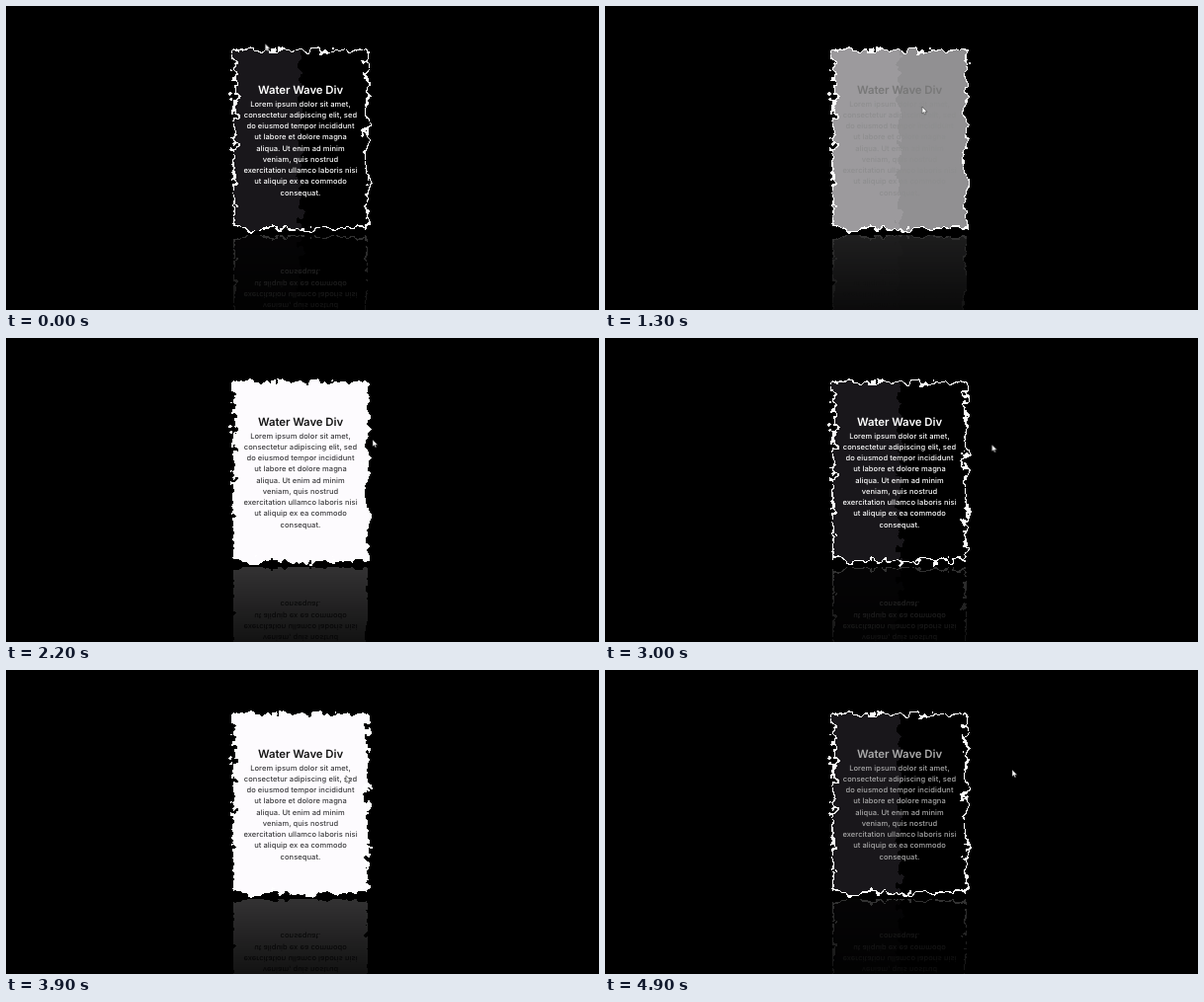
An HTML page for the animation above (5 s loop, 600x308 px).

```html
<!DOCTYPE html>
<html lang="en">
<head>
<meta charset="utf-8">
<title>Water Wave Div</title>
<style>
  html, body { margin: 0; width: 100%; height: 100%; overflow: hidden; background: #000; }
  svg { position: absolute; }
  .card {
    position: absolute; left: 230px; top: 44px; width: 136px; height: 183px;
    -webkit-box-reflect: below 5px linear-gradient(transparent 35%, rgba(0, 0, 0, .2));
  }
  .wave {
    position: absolute; inset: 0; box-sizing: border-box;
    border: 2px solid #fff; background: #000; filter: url(#wave);
    animation: fill 5s infinite; --off: #000;
  }
  .half {
    position: absolute; left: 0; top: 0; width: 50%; height: 100%;
    animation: fill 5s infinite; --off: #19171b;
  }
  .text {
    position: absolute; left: -10px; right: -10px; top: 32.5px; text-align: center;
    font: 500 7.5px/11.25px Inter, "Open Sans", sans-serif; letter-spacing: .08px;
    text-rendering: geometricPrecision; white-space: pre-line;
    animation: ink 5s infinite; --on: #3a3a3c;
  }
  h2 {
    margin: 0; font-size: 11.4px; line-height: 17px; font-weight: 600; letter-spacing: -.06px;
    position: relative; top: .5px;
    animation: ink 5s infinite; --on: #141414;
  }
  p { margin: 0; }
  .cursor { left: 0; top: 0; overflow: visible; animation: move 5s linear infinite; }

  @keyframes fill {
    0%, 22.7% { background: var(--off); }
    32.7%, 44% { background: #fdfbfe; }
    54%, 63.6% { background: var(--off); }
    73.6%, 88% { background: #fdfbfe; }
    97%, 100% { background: var(--off); }
  }
  @keyframes ink {
    0%, 22.7% { color: #fff; }
    32.7%, 44.4% { color: var(--on); }
    54.4%, 63.6% { color: #fff; }
    73.6%, 89% { color: var(--on); animation-timing-function: linear; }
    98% { color: #a9a9a9; animation-timing-function: linear; }
    100% { color: #fff; }
  }
  @keyframes move {
    0% { transform: translate(261px, 38px); animation-timing-function: ease-out; }
    8% { transform: translate(558px, 66px); animation-timing-function: ease-in-out; }
    12% { transform: translate(528.5px, 74px); animation-timing-function: ease-in; }
    22.4% { transform: translate(364px, 99px); }
    26% { transform: translate(321px, 102px); animation-timing-function: ease-out; }
    31% { transform: translate(300px, 108px); }
    38% { transform: translate(304px, 110px); animation-timing-function: ease-in; }
    44% { transform: translate(370.5px, 103px); }
    48% { transform: translate(467px, 98px); }
    50% { transform: translate(468px, 98px); animation-timing-function: ease-out; }
    60% { transform: translate(391.5px, 108px); }
    62% { transform: translate(391px, 108px); }
    64% { transform: translate(364px, 109px); animation-timing-function: ease-out; }
    72% { transform: translate(325px, 110px); }
    78% { transform: translate(344px, 107px); }
    86% { transform: translate(350px, 105px); }
    89% { transform: translate(368px, 103px); animation-timing-function: ease-out; }
    96%, 100% { transform: translate(412px, 101px); }
  }
</style>
</head>
<body>
<svg width="0" height="0">
  <filter id="wave" x="-10%" y="-10%" width="120%" height="120%" color-interpolation-filters="sRGB">
    <feTurbulence id="noise" type="fractalNoise" baseFrequency="0.09" numOctaves="3" seed="4" result="n"/>
    <feDisplacementMap in="SourceGraphic" in2="n" scale="17" xChannelSelector="R" yChannelSelector="G"/>
    <feGaussianBlur stdDeviation="0.35"/>
  </filter>
</svg>

<div class="card">
  <div class="wave"><div class="half"></div></div>
  <div class="text"><h2>Water Wave Div</h2><p>Lorem ipsum dolor sit amet,
consectetur adipiscing elit, sed
do eiusmod tempor incididunt
ut labore et dolore magna
aliqua. Ut enim ad minim
veniam, quis nostrud
exercitation ullamco laboris nisi
ut aliquip ex ea commodo
consequat.</p></div>
</div>

<svg class="cursor" width="6" height="9">
  <path d="M0 0V7L1.6 5.6L2.7 8L3.8 7.5L2.8 5.2H5Z" fill="#fff" stroke="#222" stroke-width=".5"/>
</svg>

<script>
  const noise = document.getElementById('noise');

  // The noise frequency sways once per loop, so edges far from the corner shift most.
  function draw() {
    const a = performance.now() / 5000 * 2 * Math.PI;
    const fx = 0.09 + 0.002 * Math.sin(a);
    const fy = 0.09 + 0.002 * Math.sin(2 * a);
    noise.setAttribute('baseFrequency', fx.toFixed(5) + ' ' + fy.toFixed(5));
    requestAnimationFrame(draw);
  }
  draw();
</script>
</body>
</html>
```
